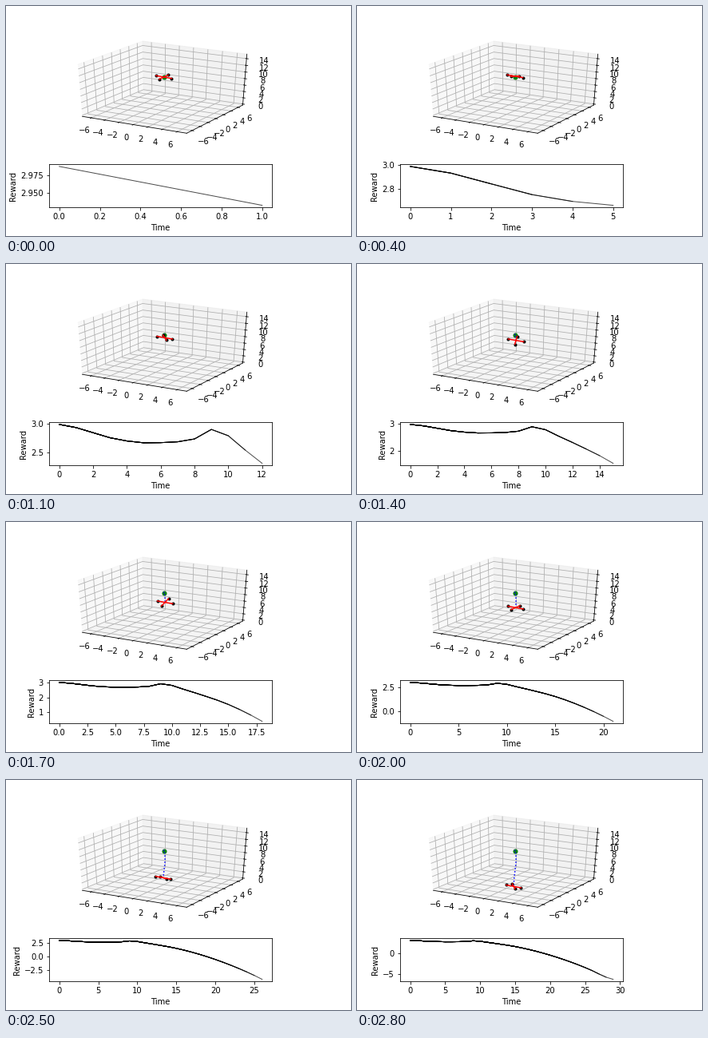
A matplotlib script for the animation above (2900 ms loop, 432x288 px).

```python
import numpy as np
import matplotlib.pyplot as plt
from matplotlib.animation import FuncAnimation
from mpl_toolkits.mplot3d import Axes3D

W, H, DPI = 432, 288, 72
FRAMES, INTERVAL = 29, 100
STEPS = np.arange(FRAMES + 1)
GOAL = (0, 0, 10)
ARM = 1.07


class WideAxes(Axes3D):
    """3D axes that fill their rectangle instead of staying square."""

    def apply_aspect(self, position=None):
        pass


def rect(left, top, width, height):
    """Pixel box, measured from the top left, as figure fractions."""
    return [left / W, 1 - (top + height) / H, width / W, height / H]


def padded(low, high):
    """Axis limits with a small margin around the data range."""
    margin = (high - low) / 48
    return low - margin, high + margin


def smooth(t, keys):
    """Cubic Hermite curve through (time, value) key points."""
    x, y = np.array(keys).T
    slope = np.gradient(y, x)
    i = np.clip(np.searchsorted(x, t, side="right") - 1, 0, len(x) - 2)
    span = x[i + 1] - x[i]
    u = (t - x[i]) / span
    ease = u * u * (3 - 2 * u)
    bend = u * (1 - u) * ((1 - u) * slope[i] - u * slope[i + 1])
    return y[i] + ease * (y[i + 1] - y[i]) + span * bend


# Flight: a short climb, back through the goal, then a tumbling fall.
lift = smooth(STEPS, [(0, 0.013), (1, 0.068), (3, 0.245), (6, 0.33),
                      (9, 0.10), (10, -0.21), (12, -0.69), (15, -1.47),
                      (21, -4.04), (26, -7.18), (28, -8.75), (29, -9.25)])
reward = 3 - np.abs(lift)
path = np.array([0.17 * np.sin(np.pi * (STEPS / 24) ** 2),
                 0 * STEPS,
                 GOAL[2] + 0.98 * lift - 0.022 * lift ** 2])
roll = np.radians(np.interp(STEPS, [1, 12, 21, 29], [3, -68, -180, -252]))

fig = plt.figure(figsize=(W / DPI, H / DPI), dpi=DPI, facecolor="white")

space = WideAxes(fig, rect(60, 35.4, 268, 132), elev=30, azim=-60)
fig.add_axes(space)
# Undo the default scaling, so the unpadded box is a unit cube.
space.set_box_aspect((1, 1, 1), zoom=3 ** 0.5 / 1.8294640721620434)
space.set(xlim=padded(-7, 7), ylim=padded(-7, 7), zlim=padded(0, 15),
          xticks=range(-6, 7, 2), yticks=range(-6, 7, 2), zticks=range(0, 15, 2))

space.plot(*[[c] for c in GOAL], "o", color="green", ms=5, zorder=2)
trail, = space.plot([], [], [], ":", color="blue", lw=1.5, zorder=3)
rotors, = space.plot([], [], [], "o", color="black", ms=3, zorder=4)
arms = [space.plot([], [], [], color="red", lw=1.5, zorder=5)[0] for _ in range(2)]

chart = fig.add_axes(rect(54, 198.45, 279.4, 53.55))


def draw(frame):
    n = frame + 1
    center = path[:, n]
    half_arms = (ARM * np.array([1, 0, -0.08]),
                 ARM * np.array([0, np.cos(roll[n]), np.sin(roll[n])]))
    tips = []
    for line, half in zip(arms, half_arms):
        ends = np.array([center - half, center + half])
        line.set_data_3d(*ends.T)
        tips.extend(ends)
    rotors.set_data_3d(*np.array(tips).T)
    trail.set_data_3d(*path[:, :n + 1])

    # Each step draws over the older curve, which darkens its early part.
    chart.clear()
    for end in range(2, n + 2):
        chart.plot(STEPS[:end], reward[:end], color="black", lw=1, alpha=0.7)
    chart.set(xlabel="Time", ylabel="Reward")


anim = FuncAnimation(fig, draw, frames=FRAMES, interval=INTERVAL,
                     repeat=True, repeat_delay=0)
plt.show()
```
